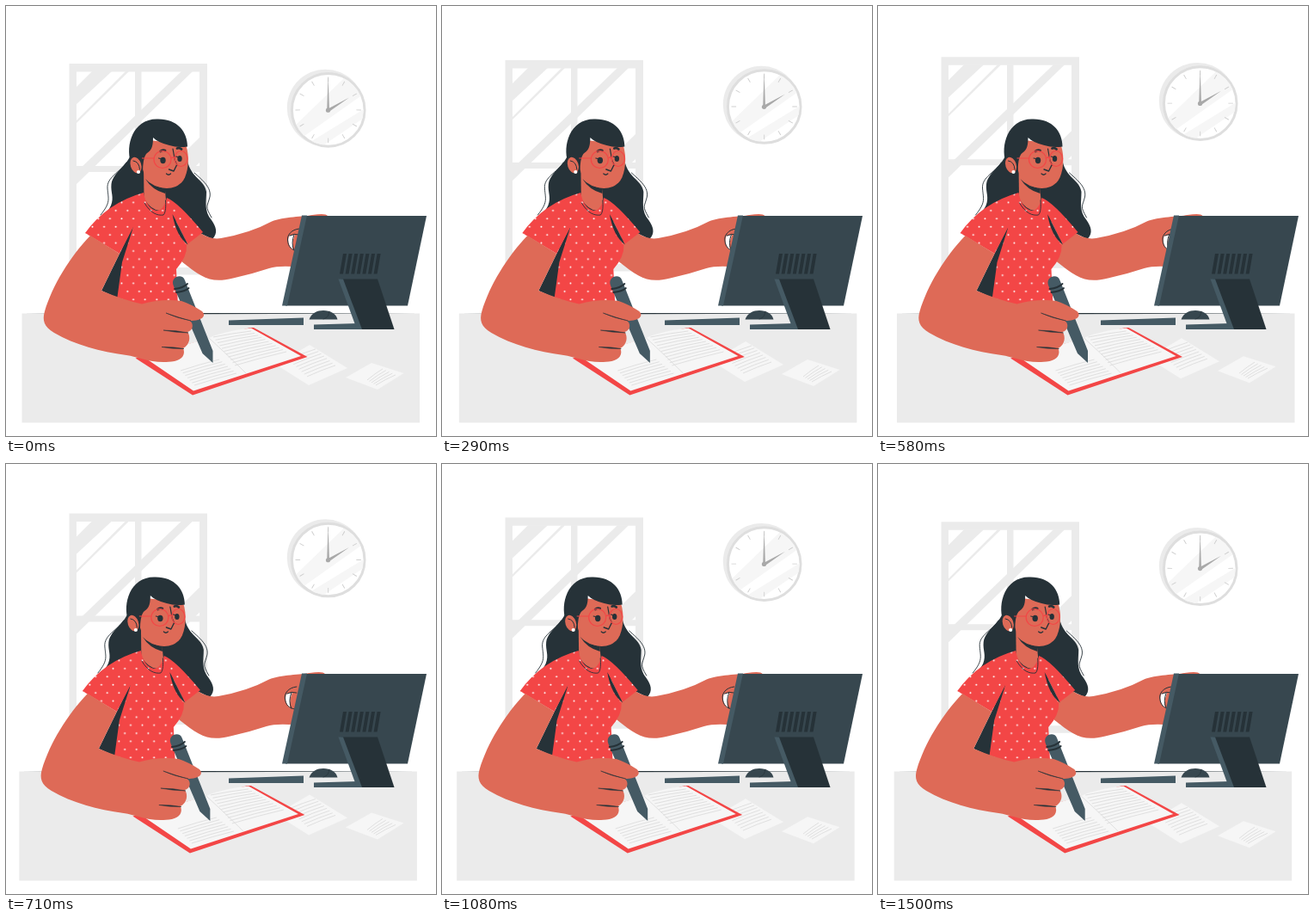
Recreate the animation shown at these times as an HTML page. Size 500x500 px, loop 1540 ms.

```html
<!DOCTYPE html>
<html lang="en">
<head>
<meta charset="utf-8">
<title>Working at the desk</title>
<style>
  html, body { margin: 0; height: 100%; overflow: hidden; background: #fff; }
  svg { display: block; width: 100vw; height: 100vh; }
  .pale { fill: #ebebeb; }
  .paper { fill: #f6f6f6; }
  .skin { fill: #de6a57; }
  .red { fill: #f34646; }
  .ink { fill: #263238; }
  .slate { fill: #37474f; }
  .steel { fill: #455a64; }
  .line { fill: none; stroke: #263238; stroke-linecap: round; stroke-linejoin: round; }
  .frame { fill: none; stroke: #f34646; stroke-width: 1.2; }
  .text { fill: none; stroke: #dadada; stroke-width: .8; }
</style>
</head>
<body>
<svg viewBox="0 0 500 500">
  <defs>
    <pattern id="dots" width="13.6" height="18.8" x="137.9" y="233.2" patternUnits="userSpaceOnUse">
      <rect width="13.6" height="18.8" class="red"/>
      <g fill="#fff"><circle cx="3.4" cy="4.7" r="1"/><circle cx="10.2" cy="14.1" r="1"/></g>
    </pattern>
    <clipPath id="dial"><circle cx="374.7" cy="121" r="41"/></clipPath>
  </defs>

  <g class="float">
    <g class="pale">
      <path fill-rule="evenodd" d="M73.5 67H234V312.5H73.5ZM82 76.500V304H225V76.500Z"/>
      <path d="M150 76h7.500V304H150ZM82 186h143v7H82Z"/>
      <path d="M100 76H123L82 114V94ZM139 76H143L82 136V133ZM204 76H217L82 207V193ZM225 153V182L150 255V227Z"/>
      <circle cx="371.5" cy="118.5" r="44.7"/>
    </g>
    <circle cx="374.7" cy="121" r="42.3" fill="#fff" stroke="#dedede" stroke-width="3"/>
    <path class="paper" clip-path="url(#dial)" d="M332 143L394 83L418 101L347 151ZM354 158L418 119V129L366 164Z"/>
    <circle cx="374.7" cy="121" r="35.4" fill="none" stroke="#cfcfcf" stroke-width="5.6" pathLength="360" stroke-dasharray="1.5 28.5" stroke-dashoffset=".75"/>
    <path fill="#a9a9a9" d="M373.2 121L374.6 81L376 121ZM373.5 120L399 106.5L375.5 123Z"/>
    <circle cx="374.5" cy="121.3" r="2.6" fill="#a9a9a9"/>
  </g>

  <g class="sway">
    <path class="pale" d="M18.5 357.5H481V484.5H18.5Z"/>
    <path class="ink" d="M20 357.7L230 357L480 357.6L230 358.2Z"/>
  </g>

  <g class="float">
    <path class="paper" d="M353 394L397 421L352 441L314 417Z"/>
    <path class="paper" d="M425 415L462.500 427L432 446L395 432Z"/>
    <path class="text" data-rows="8 328 411 350 431 360 399 383 418"/>
    <path class="text" data-rows="5 420 435 430 441 438 422 453 429"/>
  </g>

  <path class="steel" d="M259 365.500L346 362.500V371H259Z"/>
  <path class="slate" d="M352.500 364.500C355 357 362 354 369 354C377 354 384 358 385.500 364.500Z"/>
  <path class="line" stroke-width=".6" d="M369 364C372 363 375 362 376 355"/>

  <g class="sway">
    <!-- hair behind -->
    <path class="ink" d="M147 165C145 185 125 191 122.500 207C121.500 217 126 222 122 232C118 240 115 242 112 247L165 235L240 271C247 264 244 256 239 249C230 238 233 228 233 216C231 202 215 200 211 180Z"/>
    <path class="line" stroke-width=".9" d="M140 182C132 194 117 199 118 212C119 225 122 228 110 243M219 194C229 203 239 211 237 222C234 234 231 232 239 246"/>

    <!-- far arm -->
    <path class="skin" d="M226 264Q238 272 250 270Q284 264 309 250.500C322 245 347 245 356 243Q372 240.500 374 244L362 297L333 303Q316 302 306 305Q285 312 264 316.500C238 323 228 316 204 297L208 270Z"/>
    <path fill="#fff" d="M329 267.500L336 266Q332 275 333.500 284Q326 277 329 267.500Z"/>
    <path class="line" stroke-width="1" d="M341 259C331 260 327 267 327.500 272C328 280 332 284 339 285M330 267Q335 264 341 266M335 266Q331 276 335 284"/>

    <!-- neck and shirt -->
    <path class="skin" d="M160 185L160.500 224Q172 243 187 236L184 205Z"/>
    <path class="ink" d="M162 201Q171 211 185 211L185 218Q170 214 162 201Z"/>
    <path class="ink" d="M149 253L111 331L131 340Z"/>
    <path fill="url(#dots)" d="M160 217Q163 235 175 238Q183 238 187 223Q200 228 229 263L211 277L194 243Q200 265 210 278Q211 291 198 306L200 349H128L135 298L148 257L132 288L92 264Q117 229 160 217Z"/>
    <path class="ink" d="M193.500 242L211.500 277.500Q198 268 193.500 242Z"/>
    <path class="line" stroke-width=".9" d="M161 229C168 241 176 244 183 243C186 240 186 232 185.500 226"/>

    <!-- head -->
    <path class="skin" d="M158 155L209 161C214 175 212 194 206 203C200 211 190 213 182 211.500C170 209 162 201 159 190Z"/>
    <path class="ink" d="M145 181C139 163 147 131 176 131.500C199 131 211 146 211 163.500Q199 165 190 162Q177 159 171 153C171 166 168 168 163 172Q159 177 159 194Q152 190 145 181Z"/>
    <ellipse class="skin" cx="151" cy="185" rx="6.200" ry="9.500" transform="rotate(-18 151 185)"/>
    <path class="line" stroke-width="1" d="M148 180Q155 181 155.500 190"/>
    <circle cx="154" cy="193" r="2.100" fill="#fff"/>
    <g class="ink">
      <ellipse cx="182.500" cy="179.500" rx="3.200" ry="3.700"/>
      <ellipse cx="202" cy="177.500" rx="2.700" ry="3.500"/>
    </g>
    <path class="line" stroke-width="1.200" d="M177.500 177L182 178M197.500 175L202 176M194 166L196.500 180L199 185M186.500 195Q189 197.500 191.500 195"/>
    <path class="line" stroke-width="1.400" d="M198.500 185L195 192L189.500 190"/>
    <path class="line" stroke-width="2.800" d="M179.500 169Q182 167 185 168M199 165.500Q202 164.500 204 166.500"/>
    <g class="frame">
      <circle cx="182" cy="178.500" r="10"/>
      <ellipse cx="203.500" cy="177.500" rx="7.500" ry="9"/>
      <path d="M158 177H172M192 177Q194 175 196 177"/>
    </g>

    <!-- book -->
    <path class="red" d="M150.500 409.500L284 374H288L350.500 408L217 452.500Z"/>
    <path class="paper" d="M160 408L218 447.500L343 407L285 374.500Q253 378 236 386Z"/>
    <path class="text" d="M236 386Q260 408 279 427"/>
    <path class="text" data-rows="11 241 385 266 418 285 378 326 402"/>
    <path class="text" data-rows="7 203 424 219 441 248 411 268 427"/>

    <!-- pen -->
    <path class="steel" d="M195 326C190 315 205 310 208 319L240.500 401V415L228.500 404Z"/>
    <path class="line" stroke-width="1.800" d="M196 329Q206 328 211 323M198 333Q208 332 212.500 328"/>

    <!-- near arm -->
    <path class="skin" d="M98 267L132 288L111 331Q137 342 158 346.500Q182 340 204 343Q216 347 228 355C233 360 229 366 214 366C219 370 217 378 211 379C215 384 214 394 206 398C209 405 205 411 196 413C170 417 155 408 140 406C110 402 80 394 56 380C44 373 42 365 45 355C54 325 74 292 98 267Z"/>
    <path class="ink" d="M186 357Q203 363 215 366Q199 363 186 357ZM183 377Q198 377 212 380Q198 380 183 377ZM181 396.500Q194 396 207 398.500Q194 399 181 396.500Z" stroke="#263238" stroke-width=".5"/>
  </g>

  <path class="steel" d="M358 370.500L410 369L414 376H358Z"/>
  <path class="slate" d="M348 244H489L467 348.500H325Z"/>
  <path class="steel" d="M344 243.500H350L327 348.500H321Z"/>
  <path class="ink" id="vents"/>
  <path class="ink" d="M390 317.500H432L451.500 376H412Z"/>
  <path class="steel" d="M386.500 317.500H392L414 376H408Z"/>
</svg>
<script>
  const all = selector => [...document.querySelectorAll(selector)];
  const mix = (a, b, k) => a + (b - a) * k;

  // Ruled rows between a line of starts and a line of ends: count, start pair, end pair
  for (const path of all('[data-rows]')) {
    const [count, ax, ay, bx, by, cx, cy, dx, dy] = path.dataset.rows.split(' ').map(Number);
    let d = '';
    for (let i = 0; i < count; i++) {
      const k = i / (count - 1);
      const x1 = mix(ax, bx, k), y1 = mix(ay, by, k), x2 = mix(cx, dx, k), y2 = mix(cy, dy, k);
      d += `M${x1} ${y1}Q${(x1 + x2) / 2} ${(y1 + y2) / 2 - 1} ${x2} ${y2}`;
    }
    path.setAttribute('d', d);
  }

  let slots = '';
  for (let x = 392; x < 436; x += 6.6) slots += `M${x} 288h4l-4 23.500h-4Z`;
  document.getElementById('vents').setAttribute('d', slots);

  const LOOP = 1540, CYCLE = 1500, LEAD = 30, TICKS = 37;
  const shake = [0, -1, 2, -4, 4, -4, 4, -4, 2, -1, 0, 0];
  const floating = all('.float'), swaying = all('.sway');

  function draw(now) {
    // Motion advances in even ticks
    const tick = Math.floor(now % LOOP / LOOP * TICKS + 0.1);
    const phase = Math.min(1, (tick * LOOP / TICKS + LEAD) / CYCLE);
    const step = Math.floor(phase * 10);
    const x = mix(shake[step], shake[step + 1], phase * 10 - step) + 0.2;
    const y = 20 * Math.abs(phase - 0.5) - 9.7;
    for (const part of floating) part.setAttribute('transform', `translate(0 ${y})`);
    for (const part of swaying) part.setAttribute('transform', `translate(${x} 0)`);
  }

  const start = performance.now();
  function loop() {
    draw(performance.now() - start);
    requestAnimationFrame(loop);
  }
  loop();
</script>
</body>
</html>
```
